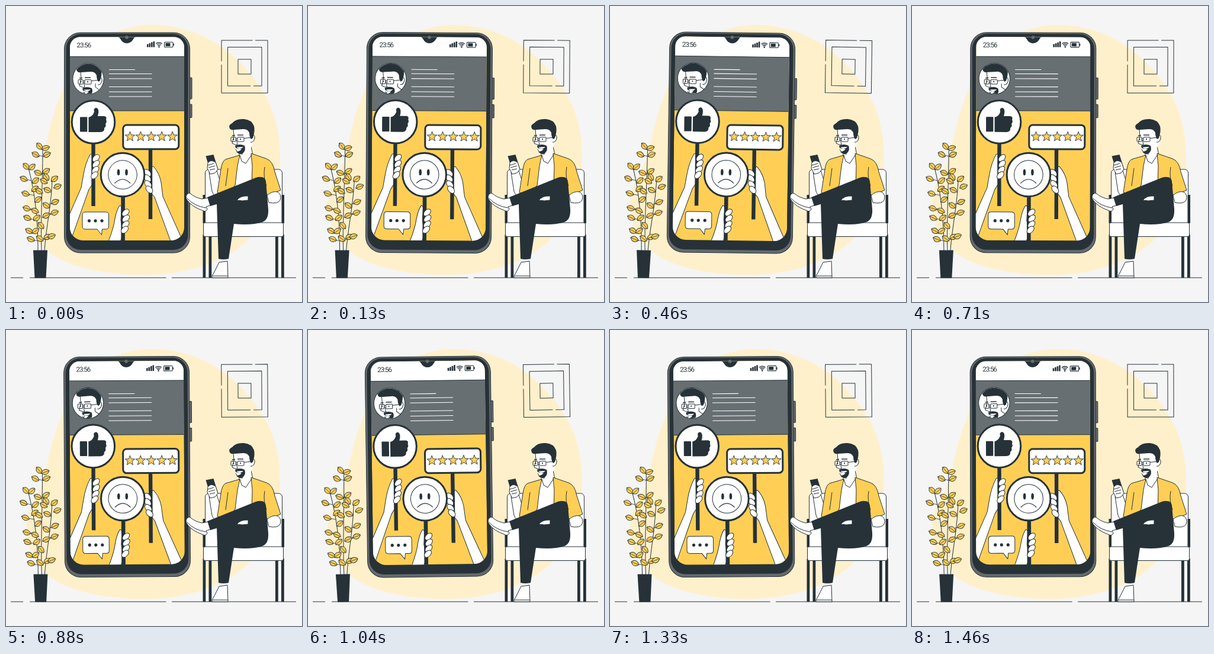
An HTML page with a canvas that plays this animation: 500 by 500 pixels, repeating every 1.5 s.

```html
<!DOCTYPE html>
<html lang="en">
<head>
<meta charset="utf-8">
<title>Reviews</title>
<style>
html, body { margin: 0; width: 100%; height: 100%; overflow: hidden; background: #f5f5f5; }
canvas { display: block; width: 500px; height: 500px; }
</style>
</head>
<body>
<canvas id="stage"></canvas>
<script>
const canvas = document.getElementById('stage');
const ctx = canvas.getContext('2d');
const ratio = window.devicePixelRatio || 1;
canvas.width = canvas.height = 500 * ratio;

const INK = '#263238', AMBER = '#ffcf55', WHITE = '#fff', GRAY = '#676f73', RIM = '#666a6c';
const LOOP = 1500, STEPS = 36;

function paint(path, fill, stroke = INK, width = 1) {
  const shape = typeof path === 'string' ? new Path2D(path) : path;
  if (fill) { ctx.fillStyle = fill; ctx.fill(shape); }
  if (stroke) { ctx.strokeStyle = stroke; ctx.lineWidth = width; ctx.stroke(shape); }
}
const line = (d, color = INK, width = 1) => paint(d, null, color, width);

function box(x, y, w, h, r, fill, stroke = null, width = 1) {
  const shape = new Path2D();
  shape.roundRect(x, y, w, h, r);
  paint(shape, fill, stroke, width);
}

function oval(x, y, rx, ry, fill, stroke = null, width = 1, tilt = 0) {
  const shape = new Path2D();
  shape.ellipse(x, y, rx, ry, tilt * Math.PI / 180, 0, 2 * Math.PI);
  paint(shape, fill, stroke, width);
}

function rotated(x, y, degrees, draw) {
  ctx.save();
  ctx.translate(x, y);
  ctx.rotate(degrees * Math.PI / 180);
  ctx.translate(-x, -y);
  draw();
  ctx.restore();
}

function backdrop() {
  ctx.fillStyle = '#f5f5f5';
  ctx.fillRect(0, 0, 500, 500);
  paint('M245 32 C335 32 402 86 440 155 C461 193 465 240 462 280 C457 345 422 397 365 426 C318 449 266 456 216 454 C158 452 103 440 70 414 C42 392 26 343 38 308 C47 286 62 266 68 235 C76 193 94 126 128 86 C157 51 202 32 245 32Z', '#fff0cc', null);
  line('M8 459H29M40 459H270.5M280 459H490');
}

function picture() {
  line('M416.500 58H364V93.500M364 99V147H442V58H421');
  line('M413 135H374.500V69.500H432V135H418');
  line('M392 90H414V115H392Z');
}

const leaves = [
  [56.5, 237, 50], [67, 240, -18], [50, 251, 28], [69, 251, -25],
  [34, 271, 45], [44, 272, -42], [54, 282, 22], [68, 279, -35],
  [30, 292, 25], [50, 295, -40], [68, 289, 55], [82, 292, -38],
  [64, 296, 30], [87, 305, -22], [49, 309, -38], [56, 313, 30],
  [70, 311, 24], [33, 317, 20], [54, 327, -38], [68, 337, 35],
  [83, 331, -25], [35, 342, 18], [49, 346, 25], [82, 349, -20],
  [36, 358, 25], [52, 358, -40], [68, 354, -25], [59, 371, 50],
  [39, 380, 28], [50, 380, -35], [42, 394, 22], [57, 393, 35],
  [70, 390, -25], [77, 389, -20]
];

function plant() {
  line('M60 413C58 365 62 305 62 242M54 413C54 365 50 318 37 270M65 413C68 370 78 330 78 288');
  line('M62 254L52 251M61 283L54 282M43 295L31 292M48 320L33 317M60 314L54 313M72 335L83 331M51 345L35 342M70 354L83 349M53 362L36 358M54 384L39 380M54 397L42 394M63 395L77 389', INK, .8);
  for (const [x, y, angle] of leaves) {
    rotated(x, y, angle, () => {
      paint(`M${x - 7} ${y}Q${x - 3} ${y - 6.5} ${x + 3} ${y - 3.6}Q${x + 6} ${y - 2} ${x + 7} ${y}Q${x + 2} ${y + 6} ${x - 3} ${y + 3.8}Z`, AMBER, INK, .9);
      line(`M${x - 7} ${y}H${x + 6}`, INK, .7);
    });
  }
  paint('M46 412.500H70L67.500 459.500H48.500Z', INK, null);
}

function statusBar() {
  ctx.fillStyle = INK;
  ctx.font = '11.5px Roboto, "Liberation Sans", sans-serif';
  ctx.letterSpacing = '-1px';
  ctx.fillText('23:56', 119.5, 70);
  for (let i = 0; i < 4; i++) {
    const height = 5 + i * 1.6;
    ctx.fillRect(238 + i * 3.5, 69.5 - height, 2.6, height);
  }
  oval(258.5, 69, 1.3, 1.3, INK);
  for (const r of [3.3, 5.6, 7.9]) {
    const arc = new Path2D();
    arc.arc(258.5, 69.5, r, -2.3, -.84);
    paint(arc, null, INK, 1.3);
  }
  box(267.5, 61, 14.5, 8.5, 1, null, INK, 1.1);
  box(269.5, 62.5, 8, 5.5, 0, INK);
  box(282.5, 63.5, 1.5, 3.5, 0, INK);
}

function head() {
  paint('M383 205L384 219L381 232L387 235L389 246Q396 254 404 249L412 244L418 230Q421 222 417 219L410 205Z', WHITE, null);
  line('M384 208L385 220L382 232L387 234M388 242Q392 251 400 250M415 219Q421 216 420 224Q418 231 413 230');
  paint('M378 207Q375 201 382 198Q388 190 402 191Q415 192 419 203Q421 211 417 223L414 225Q411 221 411 214Q408 207 400 208L385 209Q380 210 378 207Z', INK, null);
  box(380, 221.5, 8, 7.5, 1, null, INK);
  box(391, 221.5, 11, 7.5, 1, null, INK);
  line('M388 223.500H391M402 223.500L415 222');
  line('M389 225L391 234L387 234.500');
  line('M382 219L387 218.500M391 218L401 218', INK, 1.5);
  oval(384.5, 225, .9, 1.4, INK);
  oval(396, 225, .9, 1.4, INK);
  paint('M387 236Q395 232 403 236Q406 243 400 249Q394 252 389 246Q394 246 398 242L388 240Z', INK, null);
  paint('M389 238.500L401 238Q396 244 389 238.500Z', WHITE, null);
}

function avatar() {
  oval(139, 123, 26.2, 26.2, WHITE, INK);
  ctx.save();
  const clip = new Path2D();
  clip.arc(139, 123, 25.5, 0, 7);
  ctx.clip(clip);
  ctx.translate(-258, -97);
  head();
  ctx.restore();
  line('M151 131L151 137L158 142M133 145L132 148');
}

function grip(fingers, tilt) {
  for (const [x, y] of fingers) oval(x, y, 7.2, 4.6, WHITE, INK, 1, tilt);
}

function thumbSign() {
  paint('M100 368L127 307Q129 295 131 284Q134 266 142 251Q146 248 146 254L145 268L149 296L140 310L108 400H98Z', WHITE);
  box(144.3, 230, 6.4, 108, 0, INK);
  grip([[152, 257], [152, 267], [151, 277], [149.5, 286]], -48);
  oval(147.5, 196, 36.3, 36.3, WHITE, INK, 3);
  box(125, 187.5, 12.3, 25, 1, INK);
  paint('M139.500 188Q146 187 149 179L148.500 175Q150 171 154 172.500Q158 176 155 186H166Q171 187 169 192Q171 196 168 199Q170 203 166 206Q167 212 160 213H139.500Z', INK, null);
}

function star(x, y) {
  const shape = new Path2D();
  for (let i = 0; i < 10; i++) {
    const r = i % 2 ? 3.6 : 8.7, a = i * Math.PI / 5 - Math.PI / 2;
    shape.lineTo(x + r * Math.cos(a), y + r * Math.sin(a));
  }
  shape.closePath();
  paint(shape, AMBER, INK, .9);
}

function starSign() {
  paint('M246 281Q245 270 249 271Q259 282 262 298L265 322L300 400H279L251 323Q246 317 241 309Z', WHITE);
  box(240.8, 240, 6.4, 120, 0, INK);
  grip([[239, 282], [239, 291], [240, 301], [242, 310]], 48);
  box(197.8, 201, 94, 40.8, 6, WHITE, INK, 3);
  for (let i = 0; i < 5; i++) star(209.5 + i * 17.9, 220.7);
}

function sadSign() {
  paint('M172 400Q182 375 184 359Q187 344 192 337Q196 337 195 346L194 362L198 386L192 400Z', WHITE);
  box(194.3, 320, 6.6, 80, 0, INK);
  grip([[202, 349], [202.5, 359], [202, 369], [200.5, 378]], -45);
  oval(197, 285, 36.8, 36.8, WHITE, INK, 3);
  oval(197, 285, 24.3, 24.3, null, INK);
  oval(190, 281, 2.3, 5.2, INK);
  oval(203.5, 281, 2.3, 5.2, INK);
  line('M183.500 299.500Q197 286 210 299.500', INK, 1.2);
}

function bubble() {
  paint('M134 348H168.500Q173.500 348 173.500 353V372Q173.500 377 168.500 377H162.500L161.500 386.500L154 377H134Q129 377 129 372V353Q129 348 134 348Z', WHITE);
  for (const x of [140.5, 151, 162]) oval(x, 362.8, 2.6, 2.6, INK);
}

function phone() {
  box(309, 121, 5, 36, 1, RIM, INK);
  box(309, 166, 5, 22.5, 1, RIM, INK);
  box(98.5, 45, 212, 372, 27, RIM, INK);
  box(101.5, 47, 206, 365, 25, INK);
  ctx.save();
  const screen = new Path2D();
  screen.roundRect(108, 52.5, 193, 343.5, [17, 17, 22, 22]);
  ctx.clip(screen);
  box(108, 52, 193, 345, 0, AMBER);
  box(108, 52, 193, 33.5, 0, WHITE);
  box(108, 85.5, 193, 91.5, 0, GRAY);
  line('M108 85.500H301M108 177H301');
  paint('M189 52H219Q216 53 215 56Q211 63 204 63Q197 63 193.500 56Q192 53 189 52Z', INK, null);
  statusBar();
  line('M174 107.500H218M174 114.500H246.500M174 122.800H246.500M174 136.500H246.500M174 145H246.500M174 153H246.500', WHITE, 1.1);
  avatar();
  starSign();
  thumbSign();
  sadSign();
  bubble();
  ctx.restore();
  oval(204, 53, 2.8, 2.8, GRAY);
}

function chair() {
  for (const x of [332.5, 342.5, 455, 465]) box(x, 386, 4.8, 73, 0, INK);
  box(336.5, 276, 130, 94, 6, WHITE, INK);
  box(332.5, 319, 3.5, 48, 0, INK);
  box(465.5, 319, 4.5, 48, 0, INK);
  box(333.5, 366, 135, 23.5, 3, WHITE, INK);
}

function man() {
  // Raised forearm with the handset
  paint('M343 281L355 275L363 300L361 323Q352 324 348 313Z', WHITE);
  paint('M337.500 253.500L350.500 251L358 275L345 279Z', INK, null);
  paint('M341 265Q345 260 350 262L354 264L358 276L353 282L345 284L340 274Z', WHITE);
  line('M341 269L351 266M342 273L353 270M344 277L353 275');

  // Neck, shirt and jacket
  paint('M396 247L414 237L417 252L426 310H384L389 260Z', WHITE);
  paint('M395 252L371 259Q365 262 363 276L357 315L372 319L387 303L391 270Z', AMBER);
  paint('M414 249L440 258Q451 262 454 280L464 311L443 320L430 310H415L416 270Z', AMBER);
  line('M375 274L371 304M437 272Q434 288 440 304M395 252L398 262L405 266L415 251');
  paint('M441 320Q449 312 459 314Q466 319 463 328Q459 335 444 332Z', WHITE);
  head();

  // Legs and shoes
  paint('M360 433L374 431L375 459H348Q347 456 351 451Z', WHITE);
  line('M349 456H375');
  paint('M356 334L400 303L428 290Q437 287 439 296L443 343Q444 361 433 365Q415 371 385 368L376 427Q367 429 359 427Z', INK, null);
  paint('M340 323L422 290Q436 286 438 296Q439 310 424 315L345 338Z', INK, null);
  paint('M390 328Q396 320 409 321L409 328Q399 330 390 328Z', WHITE);
  paint('M307 317Q302 321 306 328Q314 339 331 345Q338 349 340 343L338 339L345 337L341 324L331 326Q318 323 312 317Q309 315 307 317Z', WHITE);
  line('M306 325Q318 338 338 341');
}

// Sway: 0 to 1 degree, across to -1, and back at constant speed
function sway(p) {
  if (p < .25) return p * 4;
  return p < .75 ? 2 - p * 4 : p * 4 - 4;
}

function draw(ms) {
  const step = Math.floor((ms % LOOP) / LOOP * STEPS + .1) % STEPS;
  const angle = sway(step / STEPS);
  ctx.setTransform(ratio, 0, 0, ratio, 0, 0);
  ctx.lineJoin = 'round';
  backdrop();
  rotated(403, 102.5, angle, picture);
  rotated(58, 346, angle, plant);
  rotated(206, 231, angle, phone);
  chair();
  man();
}

const start = performance.now();
function tick() {
  draw(performance.now() - start);
  requestAnimationFrame(tick);
}
tick();
</script>
</body>
</html>
```
